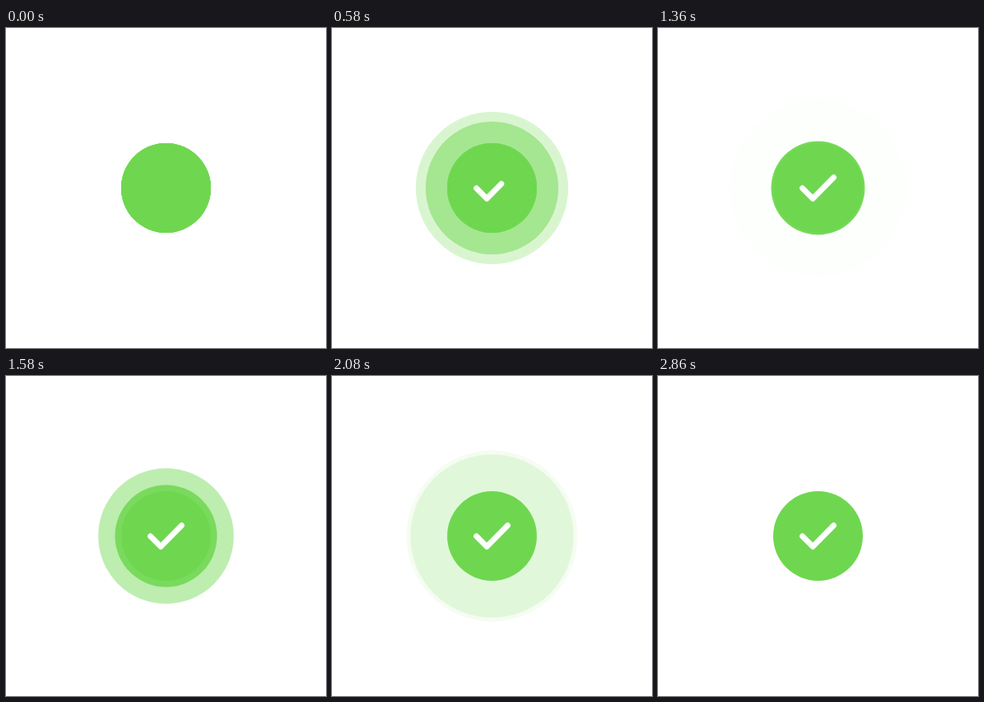
Recreate the animation shown at these times as an HTML page. Size 400 by 400 pixels, loop 2980 ms.

```html
<!DOCTYPE html>
<html lang="en">
<head>
<meta charset="utf-8">
<title>Success pulse</title>
<style>
  html, body { margin: 0; width: 100%; height: 100%; overflow: hidden; background: #fff; }
  svg { display: block; width: 100%; height: 100%; }
</style>
</head>
<body>
<svg viewBox="0 0 400 400">
  <g id="rings" fill="#6ed74f"></g>
  <circle cx="200" cy="200" r="56" fill="#6ed74f"/>
  <path id="tick" d="M180.5 200.3 193.5 213.3 219.6 186.7" pathLength="1" fill="none" stroke="#fff"
        stroke-width="7" stroke-linecap="round" stroke-linejoin="round"/>
</svg>
<script>
const LOOP = 2980;
const RADIUS = 56;
const RING_TIME = 1320;
const RING_STARTS = [160, 340, 1320, 1500];
const TICK = { start: 300, time: 680 };

const ringGroup = document.getElementById('rings');
const tick = document.getElementById('tick');

const rings = RING_STARTS.map(start => {
  const circle = document.createElementNS('http://www.w3.org/2000/svg', 'circle');
  circle.setAttribute('cx', 200);
  circle.setAttribute('cy', 200);
  ringGroup.append(circle);
  return { start, circle };
});

const bezier = (a, b, s) => 3 * (1 - s) ** 2 * s * a + 3 * (1 - s) * s * s * b + s ** 3;

// Cubic bezier (.1, .05, .1, 1): soft start, quick rise, long tail.
function ease(x) {
  if (x <= 0) return 0;
  if (x >= 1) return 1;
  let low = 0, high = 1;
  for (let i = 0; i < 24; i++) {
    const mid = (low + high) / 2;
    if (bezier(0.1, 0.1, mid) < x) low = mid; else high = mid;
  }
  return bezier(0.05, 1, low);
}

function draw(now) {
  const time = now % LOOP;
  for (const { start, circle } of rings) {
    const p = ease((time - start) / RING_TIME);
    circle.setAttribute('r', RADIUS * (1 + p));
    circle.setAttribute('opacity', (1 - p) ** 1.1);
  }
  const drawn = ease((time - TICK.start) / TICK.time);
  tick.setAttribute('visibility', drawn > 0 ? 'visible' : 'hidden');
  tick.setAttribute('stroke-dasharray', drawn < 1 ? `${drawn} 2` : 'none');
}

let begin;
function frame(now) {
  begin ??= now;
  draw(now - begin);
  requestAnimationFrame(frame);
}
draw(0);
requestAnimationFrame(frame);
</script>
</body>
</html>
```
